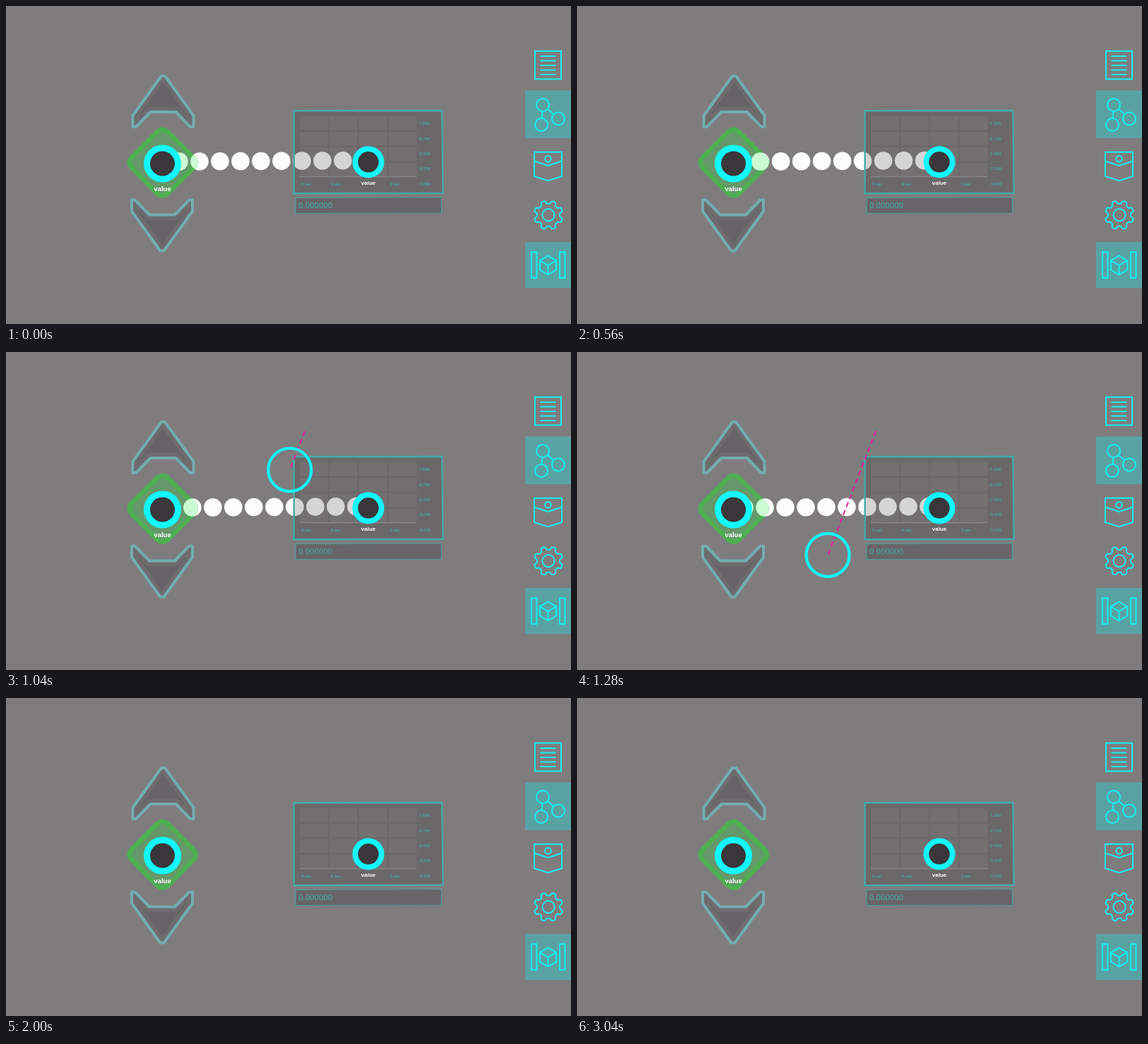
An HTML page with a canvas that plays this animation: 800 px wide and 450 px high, repeating every 3.2 s.

```html
<!DOCTYPE html>
<html>
<head>
<meta charset="utf-8">
<style>
html, body { margin: 0; width: 100%; height: 100%; overflow: hidden; background: #7f7c7e; }
canvas { display: block; }
</style>
</head>
<body>
<canvas id="stage" width="800" height="450"></canvas>
<script>
const c = document.getElementById('stage').getContext('2d');
const LOOP = 3200, STEP = 80, CUT = 1680;
const CYAN = '#12f8fb', ICON = '#14f0f0', TEAL = '#45aaa7', ACTIVE = '#58a2a4';

function paint(fill, stroke, width = 2) {
  if (fill) { c.fillStyle = fill; c.fill(); }
  if (stroke) { c.strokeStyle = stroke; c.lineWidth = width; c.stroke(); }
}
function poly(points, closed, fill, stroke, width) {
  c.beginPath();
  points.forEach(p => c.lineTo(...p));
  if (closed) c.closePath();
  paint(fill, stroke, width);
}
function circle(x, y, r, fill, stroke, width) {
  c.beginPath();
  c.arc(x, y, r, 0, Math.PI * 2);
  paint(fill, stroke, width);
}
function box(x, y, w, h, fill, stroke, width) {
  c.beginPath();
  c.rect(x, y, w, h);
  paint(fill, stroke, width);
}
function text(s, x, y, font, color, align = 'left') {
  c.font = font;
  c.fillStyle = color;
  c.textAlign = align;
  c.fillText(s, x, y);
}
// Points around a centre, with the radius given as a function of the angle.
function around(x, y, count, radius) {
  return Array.from({ length: count }, (_, i) => {
    const a = i / count * Math.PI * 2, r = radius(a);
    return [x + r * Math.sin(a), y - r * Math.cos(a)];
  });
}

// Beads flow at a constant speed from the slider to the graph.
function beads(t, color) {
  if (t >= CUT) return;
  const gap = 29, first = 216 + (0.1297 * t) % gap;
  for (let x = first; x < 513; x += gap)
    if (x > 222) circle(x, 220.3 - (x - 222) * 0.006, 12.8, color);
}

// One half of the outline is mirrored; dir is 1 for up, -1 for down.
function chevron(x, tip, dir) {
  const half = [[2.5, 0], [43, 56], [43, 72], [38.5, 72], [18, 51]];
  const side = sign => half.map(([dx, dy]) => [x + sign * dx, tip + dir * dy]);
  const outline = [...side(1), ...side(-1).reverse()];
  c.save();
  c.lineJoin = 'round';
  c.save();
  poly(outline, true, '#666366');
  c.clip();
  poly(outline, true, null, '#6e6b6e', 15);
  c.restore();
  poly(outline, true, null, '#74acad', 4);
  c.restore();
}

function diamond(side, r) {
  c.save();
  c.translate(221.7, 221.7);
  c.rotate(Math.PI / 4);
  c.beginPath();
  c.roundRect(-side / 2, -side / 2, side, side, r);
  c.restore();
}
function slider(t) {
  chevron(222.5, 99, 1);
  chevron(221, 346.5, -1);
  diamond(79, 14);
  paint('#4daf51');
  c.save();
  c.clip();
  diamond(66, 9);
  paint('#65986a');
  beads(t, '#cbfbd3');
  c.restore();
}

function graph() {
  poly([[407.7, 148.3], [617.3, 148], [618.7, 264.8], [407.7, 265.2]], true, 'rgba(10,8,10,.17)', TEAL, 2.4);
  for (let row = 0; row < 4; row++)
    for (let col = 0; col < 4; col++)
      box(416.5 + col * 41.8, 156 + row * 21.9, 39.5, 19.5, 'rgba(255,255,255,.05)');
  box(416, 240.7, 165, 1.6, '#858385');
  const small = '500 6px Roboto, sans-serif';
  for (let i = 0; i < 5; i++)
    text((1 - i / 4).toFixed(2) + '0', 585 + i * 0.3, 168.3 + i * 21.3, small, TEAL);
  for (let i = 0; i < 4; i++)
    if (i !== 2) text(8 - 2 * i + ' sec', 418 + i * 41.8, 253.7, small, TEAL);
  poly([[410, 271.5], [616.5, 270.5], [616.5, 293], [410, 293.5]], true, '#686568', '#4d9f9d', 1.2);
  text('0.000000', 414, 286.3, '11.5px Roboto, sans-serif', TEAL);
}

function node(x, y, outer, inner, labelY, size) {
  circle(x, y, outer, CYAN);
  circle(x, y, inner, '#3a373a');
  text('value', x, labelY, `bold ${size}px "Liberation Sans", Arial, sans-serif`, '#fff', 'center');
}

// A ring dragged downwards, trailing a dashed line across the beads.
function slash(t) {
  if (t < 960 || t >= CUT) return;
  const u = Math.min(1, (t - 960) / 640), p = 1 - (1 - u) ** 2;
  const x = 423 - 90.5 * p, y = 112 + 233.7 * p;
  c.setLineDash([7, 5]);
  poly([[423, 112], [x, y]], false, null, '#e91e9c', 2);
  c.setLineDash([]);
  circle(x, y, 30.5, null, CYAN, 4.2);
}

function icons() {
  const line = (...p) => poly(p, false, null, ICON);
  const loop = p => poly(p, true, null, ICON);
  const ring = (x, y, r) => circle(x, y, r, null, ICON);
  const rect = (x, y, w, h) => box(x, y, w, h, null, ICON);
  const mid = 767.5;

  rect(749, 63.7, 37, 39.8);
  for (let i = 0; i < 5; i++) line([756.5, 71 + i * 6.5], [778.5, 71 + i * 6.5]);

  box(735, 119.5, 65, 67.5, ACTIVE);
  ring(760, 140, 9);
  ring(782, 159.5, 9);
  ring(758, 168, 9);
  line([759.5, 149], [758.7, 159]);
  line([767, 146], [775, 153]);

  loop([[748, 206.7], [787, 206.7], [787, 241], [mid, 247.3], [748, 241]]);
  line([748, 219.5], [mid, 226], [787, 219.5]);
  ring(mid, 216.3, 4.3);

  const tooth = a => 18.2 - 2.3 * Math.tanh(2.5 * Math.cos(8 * a));
  loop(around(768, 295.7, 128, tooth));
  ring(768, 295.7, 8.6);

  box(735, 334, 65, 65, ACTIVE);
  for (const x of [744, 784]) rect(x, 348.3, 7.5, 36.4);
  const cube = around(mid, 366.8, 6, () => 13.4);
  loop(cube);
  for (const i of [1, 3, 5]) line(cube[i], [mid, 366.8]);
}

function draw() {
  const t = Math.floor((performance.now() - start) % LOOP / STEP) * STEP;
  box(0, 0, 800, 450, '#7f7c7e');
  beads(t, '#fcfcfc');
  graph();
  slider(t);
  node(221.5, 223, 26.5, 17.5, 261.5, 9.6);
  node(513, 220.8, 22.5, 14.7, 253.3, 8);
  slash(t);
  icons();
  requestAnimationFrame(draw);
}
const start = performance.now();
draw();
</script>
</body>
</html>
```
